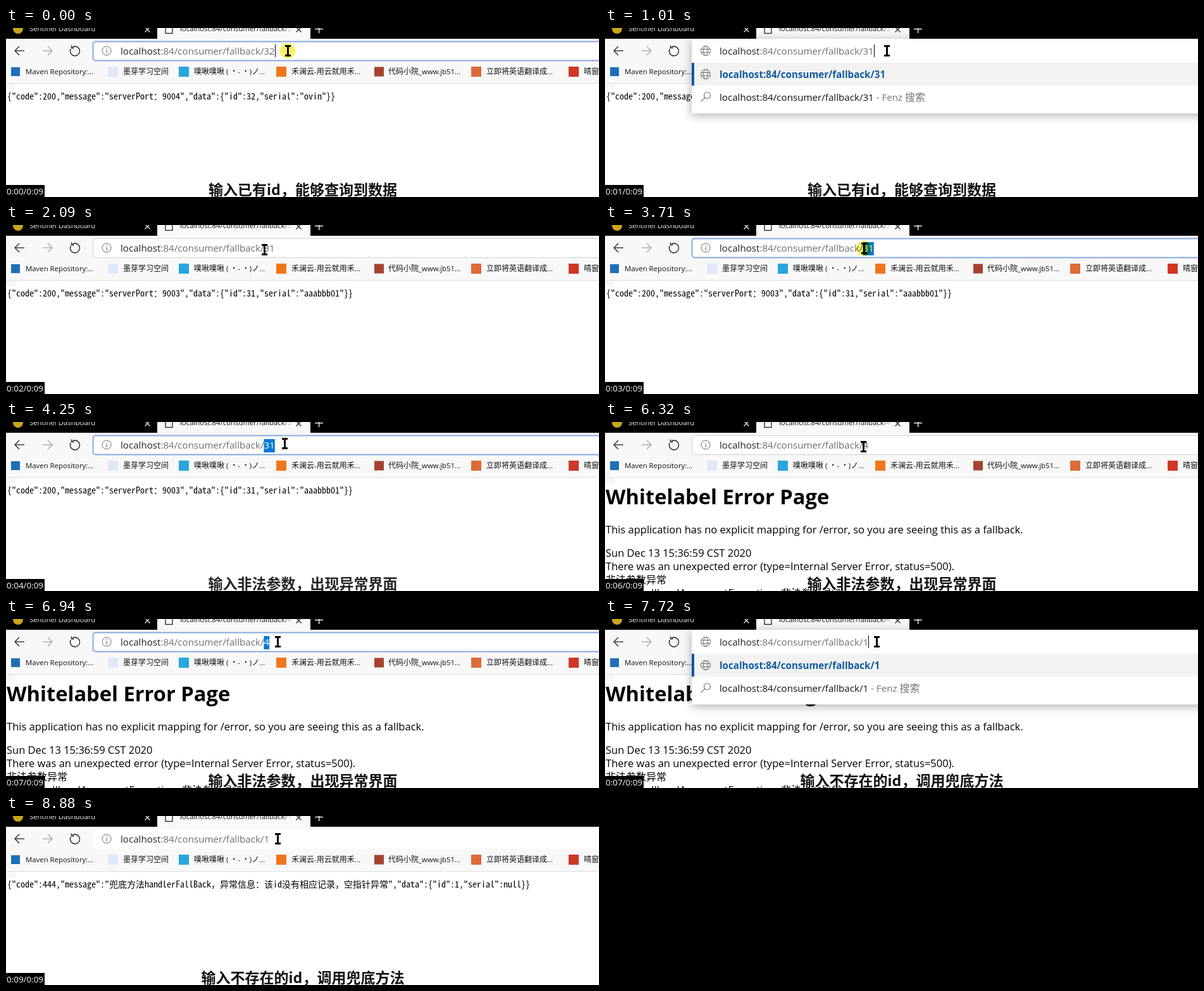
These frames come from a looping animation (937 px wide and 267 px high, 9.28 s). An HTML page with a canvas:

```html
<!DOCTYPE html>
<html lang="zh">
<head>
<meta charset="utf-8">
<title>Fallback demo</title>
<style>
html, body { margin: 0; width: 100%; height: 100%; overflow: hidden; background: #fff; }
canvas { display: block; }
</style>
</head>
<body>
<canvas id="stage" width="937" height="267"></canvas>
<script>
const ctx = document.getElementById('stage').getContext('2d');
const W = 937, H = 267, LOOP = 9280;
const SANS = '"Open Sans", "Noto Sans CJK SC", sans-serif';
const CJK = '"Noto Sans CJK SC", "Noto Sans CJK", sans-serif';
const MONO = '"Noto Sans Mono CJK SC", "Noto Sans CJK SC", monospace';
const UI = 15.15, SMALL = 11.36;
const URL_X = 181, HOST = 'localhost', PATH = ':84/consumer/fallback/';

// Timeline, in ms
const IDS = [[0, '32'], [310, '3'], [1010, '31'], [4630, '4'], [7490, '1']];
const PAGES = [[0, '32'], [1700, '31'], [5560, 'error'], [8340, 'null']];
const TITLES = [[0, '32'], [1700, '31'], [5560, '4'], [8340, '1']];
const SECONDS = [930, 1940, 2940, 3940, 4950, 5940, 6940, 7950, 8880];
const DROPDOWN = [[310, 1410], [4630, 5260], [7490, 8030]];
const TYPING = [[310, 1330], [4630, 5180], [7490, 7950]];
const LOADING = [[1330, 1700], [5180, 5560], [7950, 8340]];
const NO_ICON = [[1330, 1930], [5180, 5800], [7950, 8570]];
const FOCUS = [[0, 310], [2480, 4630], [6480, 7490]];
const HOVER = [[2010, 2480], [6320, 6480]];
const CARET = [[0, 230], [310, 780], [1010, 1330], [2860, 3090], [4630, 5180], [7490, 7950]];
const PRESSED = [[0, 80], [2400, 2630], [2860, 3010], [3090, 3330], [3710, 4170], [6400, 6940]];
const SELECT_ALL = [[2630, 2860]];
const SELECT_ID = [[3090, 4630], [6560, 7490]];
const POINTER = [
  [0, 445, 36], [1500, 445, 36], [2080, 408, 39], [2860, 408, 39], [3330, 409, 37],
  [3710, 409, 37], [4020, 440, 34], [5500, 440, 34], [5940, 406, 38], [6170, 408, 39],
  [6450, 408, 39], [6790, 429, 36], [LOOP, 429, 36]
];
const CAPTIONS = [
  { from: -200, to: 1940, text: '输入已有id，能够查询到数据' },
  { from: 4150, to: 7490, text: '输入非法参数，出现异常界面' },
  { from: 7470, to: LOOP, text: '输入不存在的id，调用兜底方法' }
];
const BOOKMARKS = [
  ['Maven Repository:...', 31, '#1e6fb8', 8, 14],
  ['墨芽学习空间', 185, '#dfe8fb', 161, 16],
  ['噗啾噗啾 ( ・- ・)ノ...', 297, '#28a6dd', 273, 16],
  ['禾澜云-用云就用禾...', 451, '#f0761c', 427, 16],
  ['代码小院_www.jb51...', 604, '#a5432f', 582, 15],
  ['立即将英语翻译成...', 759, '#dd6b38', 735, 16],
  ['晴窗', 913, '#cf3727', 889, 16]
];

const within = (t, spans) => spans.some(([a, b]) => t >= a && t < b);
const latest = (t, steps) => steps.filter(s => s[0] <= t).pop()[1];

function rect(x, y, w, h, color) {
  ctx.fillStyle = color;
  ctx.fillRect(x, y, w, h);
}

function line(color, width, ...pts) {
  ctx.strokeStyle = color;
  ctx.lineWidth = width;
  ctx.beginPath();
  for (let i = 0; i < pts.length; i += 2) ctx.lineTo(pts[i], pts[i + 1]);
  ctx.stroke();
}

function ring(x, y, rx, ry, color, width, from = 0, to = Math.PI * 2) {
  ctx.strokeStyle = color;
  ctx.lineWidth = width;
  ctx.beginPath();
  ctx.ellipse(x, y, rx, ry, 0, from, to);
  ctx.stroke();
}

function disc(x, y, r, color) {
  ctx.fillStyle = color;
  ctx.beginPath();
  ctx.arc(x, y, r, 0, Math.PI * 2);
  ctx.fill();
}

// Latin and Chinese runs differ slightly in size; returns the end x.
function text(str, x, y, size, color, weight = 400) {
  ctx.fillStyle = color;
  for (const run of str.split(/([\u2e80-\uffff]+)/)) {
    const wide = /[\u2e80-\uffff]/.test(run);
    ctx.font = wide ? `${weight} ${Math.round(size * 1.05)}px ${CJK}` : `${weight} ${size}px ${SANS}`;
    ctx.fillText(run, x, y);
    x += ctx.measureText(run).width;
  }
  return x;
}

function urlWidth(str) {
  ctx.font = `400 ${UI}px ${SANS}`;
  return ctx.measureText(str).width;
}

// Fixed grid: half an em for narrow characters, a full em for wide ones.
function mono(str, x, y) {
  ctx.fillStyle = '#000';
  ctx.font = `14px ${MONO}`;
  for (const ch of str) {
    ctx.fillText(ch, x, y);
    x += ch > '\u2e80' ? 14 : 7;
  }
}

function cross(x, y, r, color, width) {
  line(color, width, x - r, y - r, x + r, y + r);
  line(color, width, x - r, y + r, x + r, y - r);
}

function globe(x, y) {
  ring(x, y, 7.5, 7.5, '#6f6f6f', 1);
  ring(x, y, 3.4, 7.5, '#6f6f6f', 1);
  line('#6f6f6f', 1, x - 7, y - 2.5, x + 7, y - 2.5);
  line('#6f6f6f', 1, x - 7, y + 2.5, x + 7, y + 2.5);
}

function info(x, y) {
  ring(x, y, 7, 7, '#6b6b6b', 1);
  rect(x - 0.5, y - 1, 1.2, 5, '#6b6b6b');
  rect(x - 0.5, y - 4, 1.2, 1.5, '#6b6b6b');
}

function json(code, message, id, serial) {
  mono(`{"code":${code},"message":"${message}","data":{"id":${id},"serial":${serial}}}`, 2, 113);
}

function errorPage() {
  text('Whitelabel Error Page', 1, 130, 32.65, '#000', 700);
  const rows = [
    ['This application has no explicit mapping for /error, so you are seeing this as a fallback.', 176],
    ['Sun Dec 13 15:36:59 CST 2020', 213],
    ['There was an unexpected error (type=Internal Server Error, status=500).', 234]
  ];
  for (const [str, y] of rows) text(str, 1, y, 16.5, '#000');
  text('非法参数异常', 1, 255, 15.3, '#000');
  const end = text('java.lang.IllegalArgumentException: ', 1, 276, 16.5, '#000');
  text('非法参数异常', end, 276, 15.3, '#000');
}

function drawPage(t) {
  rect(0, 88, W, H - 88, '#fff');
  rect(0, 88, 15, 9, '#f7f7f7');
  const page = latest(t, PAGES);
  if (page === 'error') errorPage();
  else if (page === 'null') json(444, '兜底方法handlerFallBack，异常信息：该id没有相应记录，空指针异常', 1, 'null');
  else if (page === '31') json(200, 'serverPort：9003', 31, '"aaabbb01"');
  else json(200, 'serverPort：9004', 32, '"ovin"');
}

function drawTabs(t) {
  rect(0, 0, W, 17, '#000');
  rect(239, 0, 242, 17, '#f8f8f8');
  disc(19, 1, 8, '#c9a51a');
  text('Sentinel Dashboard', 37, 5, SMALL, '#f0f0f0');
  cross(223.5, 2.5, 4, '#eee', 1.3);
  if (!within(t, NO_ICON)) {
    ctx.strokeStyle = '#222';
    ctx.lineWidth = 1.3;
    ctx.strokeRect(252, -5, 11, 13.5);
  }
  const fade = ctx.createLinearGradient(436, 0, 453, 0);
  fade.addColorStop(0, '#111');
  fade.addColorStop(1, 'rgba(17,17,17,0)');
  text(HOST + PATH + latest(t, TITLES), 275, 5, SMALL, fade);
  cross(462.5, 2.5, 4, '#222', 1.3);
  rect(488, 1, 13, 1.3, '#fff');
  rect(494, 0, 1.3, 8, '#fff');
}

function drawToolbar(t) {
  rect(0, 17, W, 71, '#f8f8f8');
  rect(0, 87, W, 1, '#dedede');
  line('#222', 1.3, 29, 36, 14, 36);
  line('#222', 1.3, 21, 29, 14, 36, 21, 43);
  line('#a3a3a3', 1.3, 58, 36, 73, 36);
  line('#a3a3a3', 1.3, 66, 29, 73, 36, 66, 43);
  if (within(t, LOADING)) {
    cross(109, 36, 6, '#222', 1.3);
  } else {
    ring(109, 36.5, 7.5, 7.5, '#222', 1.4, -2.1, 3.6);
    line('#222', 1.4, 103.5, 27.5, 103.5, 31.5, 107.5, 31.5);
  }
  for (const [label, x, color, iconX, size] of BOOKMARKS) {
    rect(iconX, 69 - size / 2, size, size, color);
    text(label, x, 73, SMALL, '#111');
  }
  const focus = within(t, FOCUS), hover = within(t, HOVER);
  ctx.fillStyle = '#fff';
  ctx.beginPath();
  ctx.roundRect(137.5, 21.5, 820, 30, 4);
  ctx.fill();
  if (focus || hover) {
    ctx.strokeStyle = focus ? '#86abdf' : '#d0d0d0';
    ctx.lineWidth = focus ? 2 : 1;
    ctx.stroke();
  }
}

function drawDropdown(id) {
  ctx.save();
  ctx.shadowColor = 'rgba(0,0,0,.32)';
  ctx.shadowBlur = 14;
  ctx.shadowOffsetY = 3;
  rect(137, 17, 840, 118, '#fff');
  ctx.restore();
  rect(137, 55, 800, 36, '#f2f2f2');
  rect(137, 55, 4, 36, '#0f5ba0');
  globe(159, 73);
  text(HOST + PATH + id, URL_X, 79, UI, '#0f5ba0', 700);
  ring(161.5, 106.5, 5, 5, '#767676', 1.1);
  line('#767676', 1.1, 158, 110, 151.5, 116.5);
  const end = text(HOST + PATH + id, URL_X, 115, UI, '#111');
  text(' - Fenz 搜索', end, 115, UI, '#767676');
}

function drawUrl(t, id) {
  if (within(t, TYPING)) globe(159, 36);
  else info(159, 36);
  const all = within(t, SELECT_ALL), part = within(t, SELECT_ID);
  const idX = URL_X + urlWidth(HOST + PATH), endX = idX + urlWidth(id);
  if (all || part) {
    const x = all ? URL_X : idX;
    rect(x, 27, endX - x, 21, '#0078d7');
  }
  const mid = text(HOST, URL_X, 42, UI, all ? '#fff' : '#222');
  text(PATH, mid, 42, UI, all ? '#fff' : '#6e6e6e');
  text(id, idX, 42, UI, all || part ? '#fff' : '#6e6e6e');
  if (within(t, CARET)) rect(Math.round(endX), 26, 1, 20, '#000');
}

function drawPointer(t) {
  const i = Math.max(1, POINTER.findIndex(p => p[0] > t));
  const [t0, x0, y0] = POINTER[i - 1], [t1, x1, y1] = POINTER[i];
  const k = (t - t0) / (t1 - t0), e = k * k * (3 - 2 * k);
  const x = Math.round(x0 + (x1 - x0) * e), y = Math.round(y0 + (y1 - y0) * e);
  if (within(t, PRESSED)) {
    ctx.globalCompositeOperation = 'multiply';
    disc(x, y, 12, '#faf05e');
    ctx.globalCompositeOperation = 'source-over';
  }
  rect(x - 1, y - 8, 3, 16, '#000');
  for (const top of [y - 9, y + 6]) rect(x - 4, top, 9, 3, '#000');
}

function drawCaption(t) {
  const cap = CAPTIONS.find(c => t >= c.from && t < c.to);
  if (!cap) return;
  ctx.save();
  ctx.globalAlpha = Math.min(1, (t - cap.from) / 110);
  ctx.font = `700 23px ${CJK}`;
  ctx.textAlign = 'center';
  ctx.lineJoin = 'round';
  ctx.lineWidth = 3;
  ctx.strokeStyle = '#fff';
  ctx.strokeText(cap.text, 469, 264);
  ctx.fillStyle = '#111';
  ctx.fillText(cap.text, 469, 264);
  ctx.restore();
}

function drawClock(t) {
  rect(0, 248, 61, 19, '#000');
  const s = SECONDS.filter(at => at <= t).length;
  text(`0:0${s}/0:09`, 1, 263, 13.4, '#fff');
}

function draw(t) {
  const id = latest(t, IDS);
  drawPage(t);
  drawTabs(t);
  drawToolbar(t);
  if (within(t, DROPDOWN)) drawDropdown(id);
  drawUrl(t, id);
  drawCaption(t);
  drawClock(t);
  drawPointer(t);
}

const start = performance.now();
function tick() {
  draw((performance.now() - start) % LOOP);
  requestAnimationFrame(tick);
}
tick();
</script>
</body>
</html>
```
